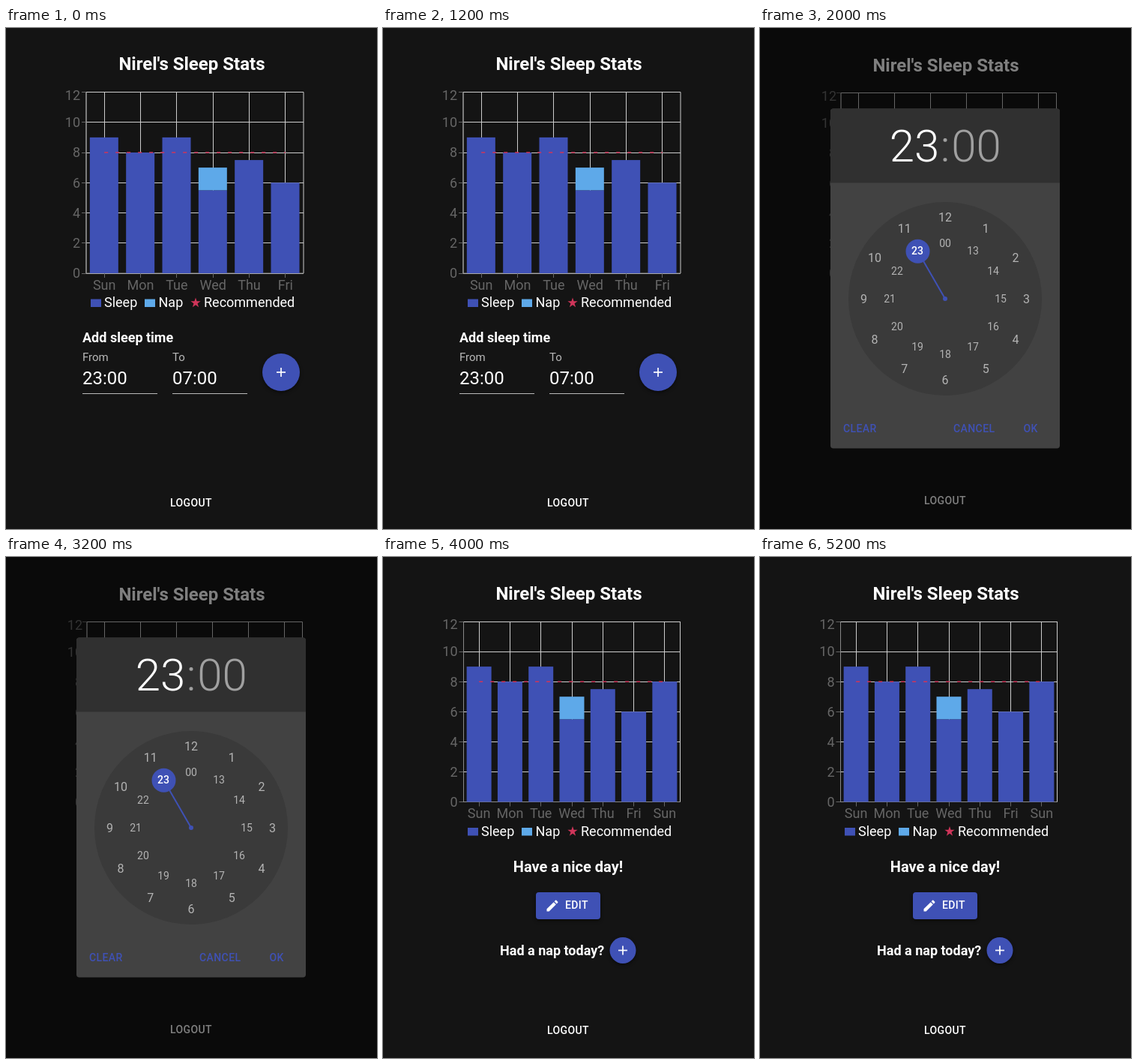
Write an HTML page that moves like this. It is 495x668 px and loops after 6000 ms.

```html
<!DOCTYPE html>
<html lang="en">
<head>
<meta charset="utf-8">
<title>Sleep Stats</title>
<style>
html, body { margin: 0; width: 100%; height: 100%; overflow: hidden; background: #141414; }
svg { position: absolute; left: 0; top: 0; width: 495px; height: 668px; font-family: Roboto, sans-serif; fill: #fff; }
.bold { font-weight: 700; }
.btn { font-size: 14px; font-weight: 500; letter-spacing: .4px; }
.axis { font-size: 18px; fill: #666; }
.mid { text-anchor: middle; }
.end { text-anchor: end; }
.primary { fill: #3f51b5; }
.shadow { filter: drop-shadow(0 2px 2px rgba(0, 0, 0, .5)); }
.view { visibility: hidden; animation: 6s step-end infinite; }
#stats { animation-name: first; }
#picker { animation-name: second; }
#done { animation-name: third; }
@keyframes first { 0% { visibility: visible; } 33.3333%, 100% { visibility: hidden; } }
@keyframes second { 0% { visibility: hidden; } 33.3333% { visibility: visible; } 66.6667%, 100% { visibility: hidden; } }
@keyframes third { 0% { visibility: hidden; } 66.6667%, 100% { visibility: visible; } }
</style>
</head>
<body>
<svg viewBox="0 0 495 668">
  <g id="stats" class="view"></g>
  <g id="picker" class="view"></g>
  <g id="done" class="view"></g>
</svg>
<script>
const BLUE = '#3f51b5', SKY = '#5ea9e9', RED = '#d0355a';
const week = [['Sun', 9], ['Mon', 8], ['Tue', 9], ['Wed', 5.5, 1.5], ['Thu', 7.5], ['Fri', 6]];

const text = (x, y, str, cls = '', size = 0, fill = '') =>
  `<text x="${x}" y="${y}" class="${cls}" style="${size ? `font-size:${size}px;` : ''}${fill ? `fill:${fill}` : ''}">${str}</text>`;
const rect = (x, y, w, h, fill, rx = 0) =>
  `<rect x="${x}" y="${y}" width="${w}" height="${h}" rx="${rx}" fill="${fill}"/>`;
const circle = (x, y, r, fill) => `<circle cx="${x}" cy="${y}" r="${r}" fill="${fill}"/>`;
const line = (x1, y1, x2, y2, stroke, width = 1, extra = '') =>
  `<path d="M${x1} ${y1}L${x2} ${y2}" stroke="${stroke}" stroke-width="${width}" ${extra}/>`;
const snap = v => Math.floor(v) + .5;

function star(cx, cy, r) {
  const pts = Array.from({ length: 10 }, (_, i) => {
    const a = i * Math.PI / 5, d = i % 2 ? r * .382 : r;
    return `${(cx + d * Math.sin(a)).toFixed(2)},${(cy - d * Math.cos(a)).toFixed(2)}`;
  });
  return `<polygon points="${pts.join(' ')}" fill="${RED}"/>`;
}

function chart({ x, y, w, h, days, labelX = 99 }) {
  const step = w / days.length, base = y + h;
  const yAt = v => base - v * h / 12;
  const mid = i => x + (i + .5) * step;
  let grid = '', axis = '', bars = '';
  for (let v = 0; v <= 12; v += 2) {
    const ly = snap(yAt(v));
    grid += line(x, ly, x + w, ly, '#ccc');
    axis += line(x - 6, ly, x, ly, '#666') + text(labelX, yAt(v) + (v === 12 ? 10 : 6.4), v, 'axis end');
  }
  grid += line(x, y, x, base, '#ccc') + line(x + w, y, x + w, base, '#ccc');
  days.forEach(([name, sleep, nap = 0], i) => {
    const bx = x + (i + .1) * step, bw = Math.floor(step * .8), m = snap(mid(i));
    grid += line(m, y, m, base, '#ccc');
    axis += line(m, base, m, base + 6, '#666') + text(mid(i), base + 21.5, name, 'axis mid');
    bars += rect(bx, yAt(sleep), bw, base - yAt(sleep), BLUE);
    if (nap) bars += rect(bx, yAt(sleep + nap), bw, yAt(sleep) - yAt(sleep + nap), SKY);
  });
  axis += line(x, y, x, base, '#888') + line(x, base, x + w, base, '#888');
  const goal = line(mid(0), yAt(8), mid(days.length - 1), yAt(8), RED, 1.5, 'stroke-dasharray="5 10"');
  return grid + axis + bars + goal;
}

const legend = y =>
  rect(113, y - 10.5, 14, 10.5, BLUE) + text(131, y, 'Sleep', '', 18) +
  rect(185, y - 10.5, 14, 10.5, SKY) + text(203.5, y, 'Nap', '', 18) +
  star(253, y - 5.5, 7) + text(264, y, 'Recommended', '', 18);

const page = (titleY, logoutY) =>
  rect(0, 0, 495, 668, '#141414') +
  text(345.5, titleY, "Nirel's Sleep Stats", 'bold end', 24) +
  text(247, logoutY, 'LOGOUT', 'btn mid');

const fab = (x, y, r) =>
  `<g class="shadow">${circle(x, y, r, BLUE)}</g>` +
  line(x - 6, y, x + 6, y, '#fff', 1.7) + line(x, y - 6, x, y + 6, '#fff', 1.7);

const field = (x, label, value) =>
  text(x, 444, label, '', 15, '#b9b9b9') + text(x, 475, value, '', 24) +
  line(x, 487.5, x + 100, 487.5, '#b9b9b9');

function clock(cx, cy) {
  const at = (hour, r) => {
    const a = hour * Math.PI / 6;
    return [cx + r * Math.sin(a), cy - r * Math.cos(a)];
  };
  const [hx, hy] = at(11, 73);
  let out = circle(cx, cy, 129, '#3a3a3a') + line(cx, cy, hx, hy, BLUE, 2) +
    circle(cx, cy, 3, BLUE) + circle(hx, hy, 16, BLUE);
  for (let i = 1; i <= 12; i++) {
    const [ox, oy] = at(i, 108.5), [ix, iy] = at(i, 74);
    out += text(ox, oy + 5.5, i, 'mid', 16, '#b3b3b3');
    out += i === 11
      ? text(ix, iy + 5, 23, 'mid', 14, '#fff;font-weight:500')
      : text(ix, iy + 5, i === 12 ? '00' : i + 12, 'mid', 14, '#b3b3b3');
  }
  return out;
}

const light = (x, str, fill) => text(x, 178, str, 'mid', 60, fill + ';font-weight:300');
const pencil = `<path transform="translate(216 455) scale(.8333)" d="M3 17.25V21h3.75L17.81 9.94l-3.75-3.75L3 17.25z
  M20.71 7.04c.39-.39.39-1.02 0-1.41l-2.34-2.34c-.39-.39-1.02-.39-1.41 0l-1.83 1.83 3.75 3.75 1.83-1.83z"/>`;

const show = (id, ...parts) => document.getElementById(id).innerHTML = parts.join('');

show('stats',
  page(56, 638),
  chart({ x: 107, y: 85.5, w: 290, h: 241.5, days: week }),
  legend(372),
  text(102, 419, 'Add sleep time', 'bold', 18),
  field(102, 'From', '23:00'), field(222, 'To', '07:00'),
  fab(367, 459, 25));

show('picker',
  page(57.5, 635),
  chart({ x: 108, y: 86.5, w: 287.5, h: 240, days: week, labelX: 102 }),
  rect(0, 0, 495, 668, 'rgba(0,0,0,.5)'),
  rect(94, 107.5, 306, 453, '#424242', 4),
  '<path d="M94 206.5V111.5a4 4 0 0 1 4-4H396a4 4 0 0 1 4 4V206.5z" fill="#303030"/>',
  light(206, '23', '#fff'), light(247, ':', '#a0a0a0'), light(288.5, '00', '#a0a0a0'),
  clock(247, 361),
  text(111, 539, 'CLEAR', 'btn primary'),
  text(258, 539, 'CANCEL', 'btn primary'),
  text(351.5, 539, 'OK', 'btn primary'));

show('done',
  page(56.5, 636),
  chart({ x: 107.5, y: 86, w: 289, h: 240.5, days: [...week, ['Sun', 8]], labelX: 99.5 }),
  legend(371.5),
  text(247, 420, 'Have a nice day!', 'bold mid', 20),
  `<g class="shadow">${rect(204, 447, 86, 36, BLUE, 4)}</g>`,
  pencil,
  text(243, 469, 'EDIT', 'btn'),
  text(156, 530.5, 'Had a nap today?', 'bold', 18),
  fab(320, 524.5, 17.5));
</script>
</body>
</html>
```
